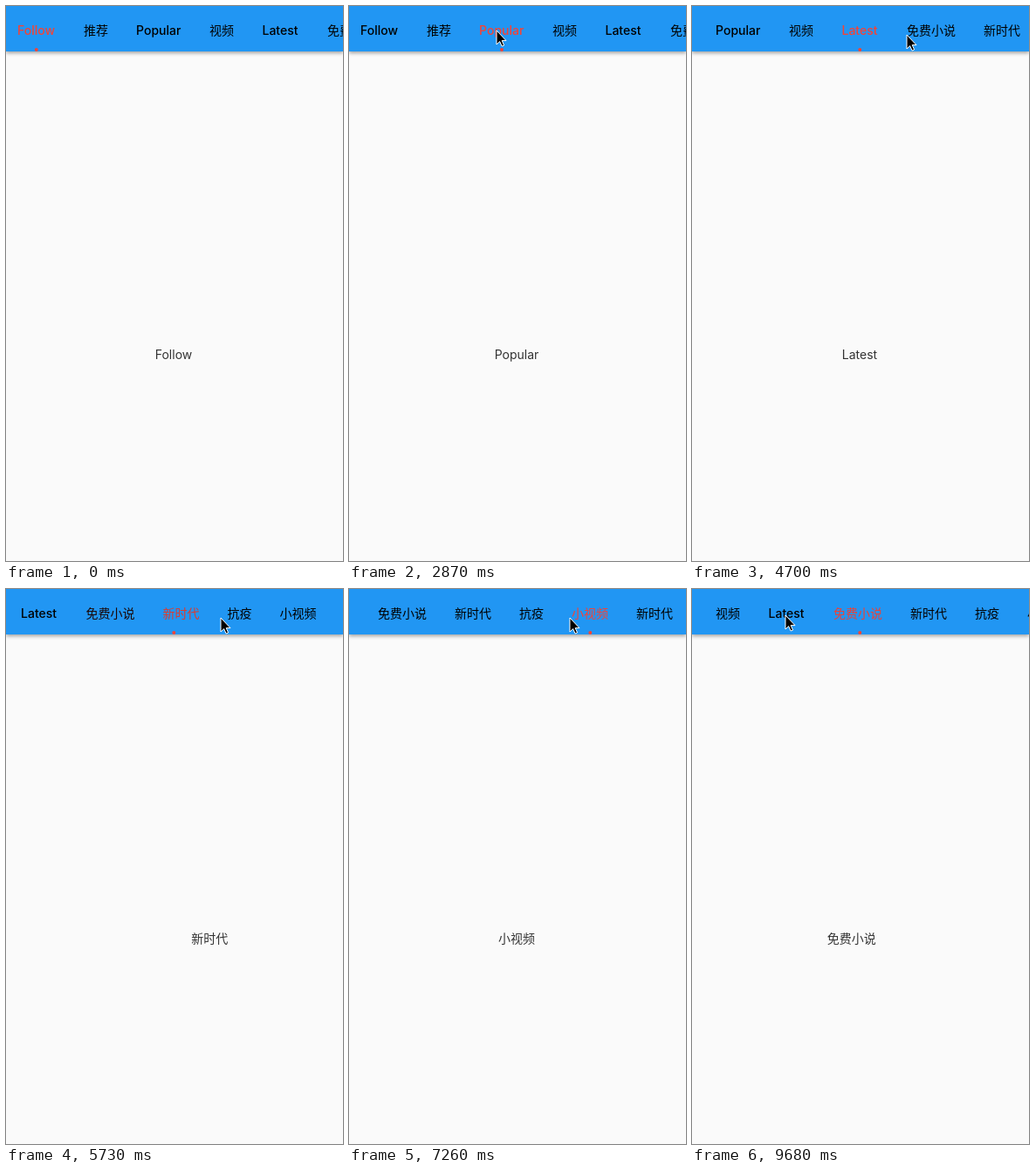
Animation, 386 px wide and 635 px high, one loop 9.78 s. Source, as an HTML page:

```html
<!DOCTYPE html>
<html lang="zh-CN">
<head>
<meta charset="utf-8">
<title>Scrolling tabs</title>
<style>
  html, body { margin: 0; width: 100%; height: 100%; overflow: hidden; background: #fafafa; }
  header { position: absolute; left: 0; right: 0; top: 0; height: 52px; background: #2196f3; box-shadow: 0 2px 4px rgba(0, 0, 0, .35); }
  svg { position: absolute; left: 0; top: 0; }
  text { font: 14px Inter, "Noto Sans CJK SC", "Noto Sans CJK", sans-serif; text-anchor: middle; }
  #tabs text { font-weight: 500; }
  .page { fill: #333; }
</style>
</head>
<body>
<header></header>
<svg width="386" height="635">
  <g id="tabs"><circle id="dot" cy="50" r="2" fill="#f44336"/></g>
  <text class="page" id="leaving"></text>
  <text class="page" id="entering"></text>
  <path id="cursor" d="M0 0V16L3.7 12.6L6.1 18L8.6 17L6.2 11.6H11Z" stroke="#fff" stroke-linejoin="round"/>
</svg>
<script>
const LOOP = 9780, SLIDE = 300, MIDDLE = 192, PAGE = 390, MAX_SCROLL = 335;
const tabs = [
  ['Follow', 34.5], ['推荐', 103], ['Popular', 174.7], ['视频', 247], ['Latest', 314],
  ['免费小说', 396], ['新时代', 477], ['抗疫', 544], ['小视频', 611], ['新时代', 685]
].map(([label, x]) => ({ label, x }));

// [start time, tab to open]
const taps = [[1725, 1], [2560, 2], [3540, 3], [4375, 4], [4960, 5], [5547, 6],
  [6165, 7], [6760, 8], [7745, 9], [8477, 6], [9440, 5]];

// [time, x, y] of the pointer tip
const trail = [[300, 129, 3], [480, 112, 67], [1050, 112, 67], [1320, 69, 32], [1470, 90, 32],
  [2040, 90, 32], [2290, 169, 28], [3020, 169, 28], [3330, 246, 33], [7200, 246, 33],
  [7560, 337, 33], [8000, 337, 33], [8190, 154, 33], [8860, 154, 33], [9190, 107, 30]];

const $ = id => document.getElementById(id);
const clamp = (v, lo, hi) => Math.min(hi, Math.max(lo, v));
const mix = (a, b, k) => a + (b - a) * k;
const smooth = k => k * k * (3 - 2 * k);
const scrollFor = tab => clamp(tab.x - MIDDLE, 0, MAX_SCROLL);

// CSS "ease": cubic-bezier(.25, .1, .25, 1)
function ease(x) {
  if (x <= 0 || x >= 1) return clamp(x, 0, 1);
  const bezier = (a, b, u) => 3 * a * u * (1 - u) ** 2 + 3 * b * u * u * (1 - u) + u ** 3;
  let lo = 0, hi = 1;
  for (let i = 0; i < 20; i++) {
    const u = (lo + hi) / 2;
    if (bezier(.25, .25, u) < x) lo = u; else hi = u;
  }
  return bezier(.1, 1, lo);
}

for (const tab of tabs) {
  tab.el = document.createElementNS('http://www.w3.org/2000/svg', 'text');
  tab.el.textContent = tab.label;
  tab.el.setAttribute('x', tab.x);
  tab.el.setAttribute('y', 33);
  $('tabs').append(tab.el);
}

function showPage(el, tab, shift) {
  el.textContent = tab.label;
  el.setAttribute('x', MIDDLE + shift);
  el.setAttribute('y', /[a-z]/.test(tab.label) ? 404 : 405);
}

function drawTabs(t) {
  let from = 0, to = 0, start = -SLIDE;
  for (const [time, index] of taps) {
    if (time > t) break;
    [from, to, start] = [to, index, time];
  }
  const k = ease((t - start) / SLIDE), a = tabs[from], b = tabs[to];
  const scroll = mix(scrollFor(a), scrollFor(b), k);
  $('tabs').setAttribute('transform', `translate(${-scroll})`);
  $('dot').setAttribute('cx', mix(a.x, b.x, k) + .3);
  tabs.forEach((tab, i) => {
    const lit = i === to ? k : i === from ? 1 - k : 0;
    tab.el.setAttribute('fill', `rgb(${244 * lit}, ${67 * lit}, ${54 * lit})`);
  });
  const dir = Math.sign(to - from);
  showPage($('leaving'), a, -dir * k * PAGE);
  showPage($('entering'), b, dir * (1 - k) * PAGE);
  $('leaving').style.display = from === to ? 'none' : '';
}

function drawCursor(t) {
  const cursor = $('cursor');
  cursor.style.display = t < trail[0][0] ? 'none' : '';
  const next = trail.findIndex(p => p[0] > t);
  const q = next < 0 ? trail.at(-1) : trail[next];
  const p = next > 0 ? trail[next - 1] : q;
  const k = p === q ? 0 : smooth((t - p[0]) / (q[0] - p[0]));
  cursor.setAttribute('transform', `translate(${mix(p[1], q[1], k)} ${mix(p[2], q[2], k)})`);
}

const origin = performance.now();
function frame() {
  const t = (performance.now() - origin) % LOOP;
  drawTabs(t);
  drawCursor(t);
  requestAnimationFrame(frame);
}
frame();
</script>
</body>
</html>
```
